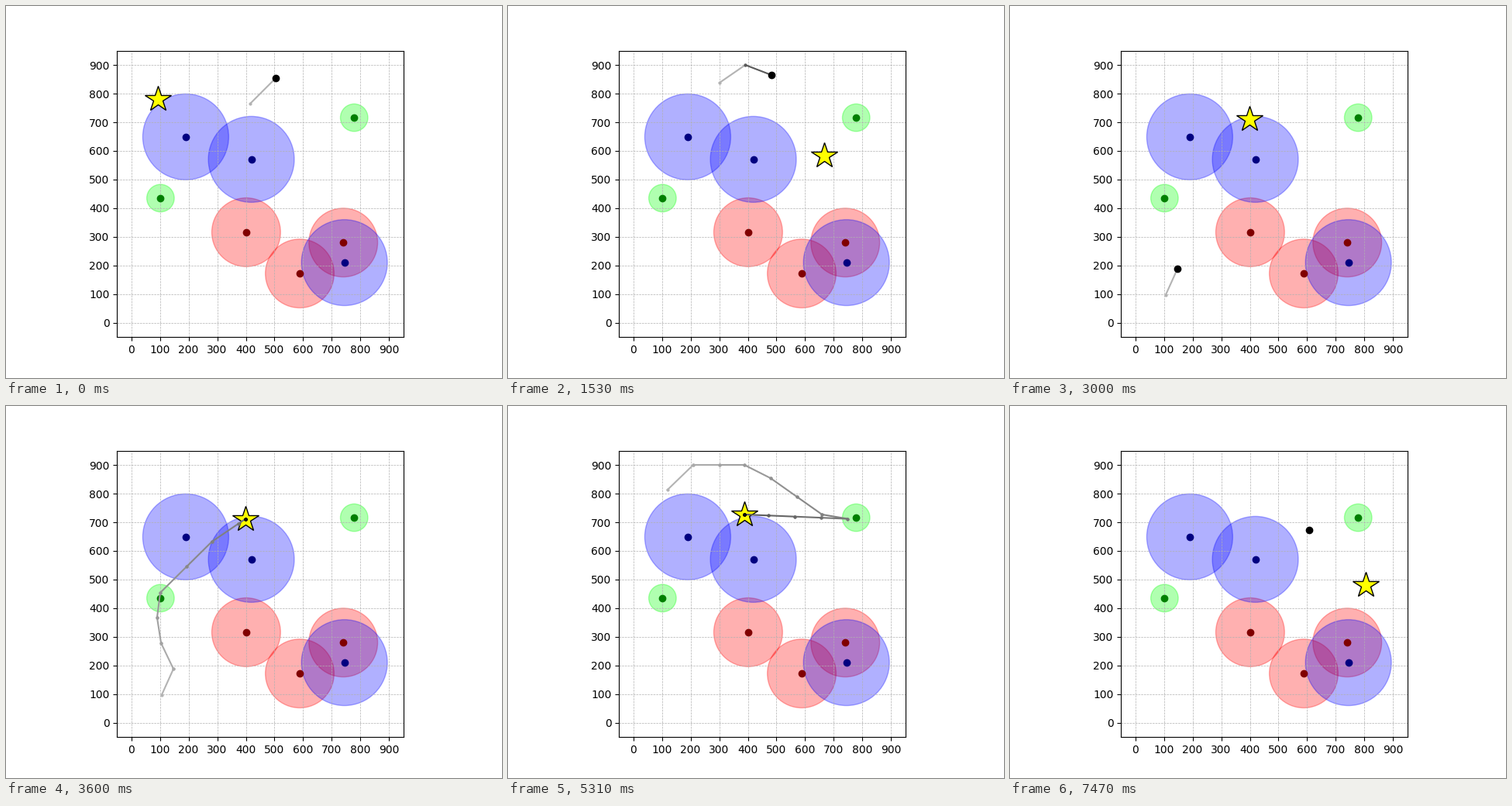
Write a matplotlib script that moves like this. It is 640 px wide and 480 px high and loops after 7.5 s.

```python
import matplotlib.pyplot as plt
from matplotlib.animation import FuncAnimation

STEPS = 50   # frames per run
FRAMES = 250
SPEED = 92   # largest move per step along either axis
FADE = 21    # the trail reaches its final shades after this many steps

# (colour, radius, centres)
ZONES = [
    ((1, 0, 0), 120, [(401, 316), (588, 172), (740, 280)]),
    ((0, 0, 1), 150, [(190, 649), (419, 570.5), (744, 210)]),
    ((0, 1, 0), 48, [(778, 716), (102, 435)]),
]

# Turning points of each run; the last one is the goal.
RUNS = [
    [(415, 765), (504, 854), (683, 741), (742, 719), (653, 787),
     (472, 624), (292, 715), (202, 732), (92, 780)],
    [(301, 838), (391, 900), (482, 865), (661, 706), (749, 697), (666, 585)],
    [(106, 97), (147, 188), (104, 278), (90, 367), (101, 454),
     (281, 632), (399, 712)],
    [(119, 813), (209, 900), (388, 900), (479, 854), (659, 727),
     (748, 712), (389, 727)],
    [(838, 618), (750, 708), (695, 618), (651, 429)],
    [(608, 673), (805, 482)],
]


def walk(keys):
    """Every position on the way through the turning points."""
    x, y = keys[0]
    path = [(x, y)]
    for kx, ky in keys[1:]:
        part = 0
        while part < 1:
            dx, dy = kx - x, ky - y
            part = min(1, SPEED / max(abs(dx), abs(dy)))
            x, y = x + dx * part, y + dy * part
            path.append((x, y))
    return path


paths = [walk(keys) for keys in RUNS]

fig, ax = plt.subplots(figsize=(6.4, 4.8), dpi=100)
ax.set_aspect("equal")
ax.set_xlim(-50, 950)
ax.set_ylim(-50, 950)
ax.set_xticks(range(0, 1000, 100))
ax.set_yticks(range(0, 1000, 100))
ax.grid(linestyle="--", linewidth=0.5)

for color, radius, centres in ZONES:
    core = [c / 2 for c in color]
    for pos in centres:
        ax.add_patch(plt.Circle(pos, radius, color=color, alpha=0.31))
        ax.plot(*pos, "o", color=core)

star, = ax.plot([], [], "*", ms=25, mfc="yellow", mec="black")
trail = [ax.plot([], [], ".-", ms=4)[0] for _ in range(FADE)]
agent, = ax.plot([], [], "o", color="black")


def update(frame):
    run, step = divmod(frame + 1, STEPS)
    path = paths[run]
    last = len(path) - 1
    shown = min(step, FADE)

    def at(k):
        return path[min(k, last)]

    gx, gy = path[-1]
    star.set_data([gx], [gy])
    x, y = at(step)
    agent.set_data([x], [y])
    agent.set_visible(step < last)
    for k, line in enumerate(trail):
        line.set_visible(k < shown)
        if k < shown:
            line.set_data(*zip(at(k), at(k + 1)))
            line.set_color(str(0.7 * (1 - k / shown)))
    return [star, *trail, agent]


anim = FuncAnimation(fig, update, frames=FRAMES, interval=30,
                     repeat=True, repeat_delay=0)
plt.show()
```
